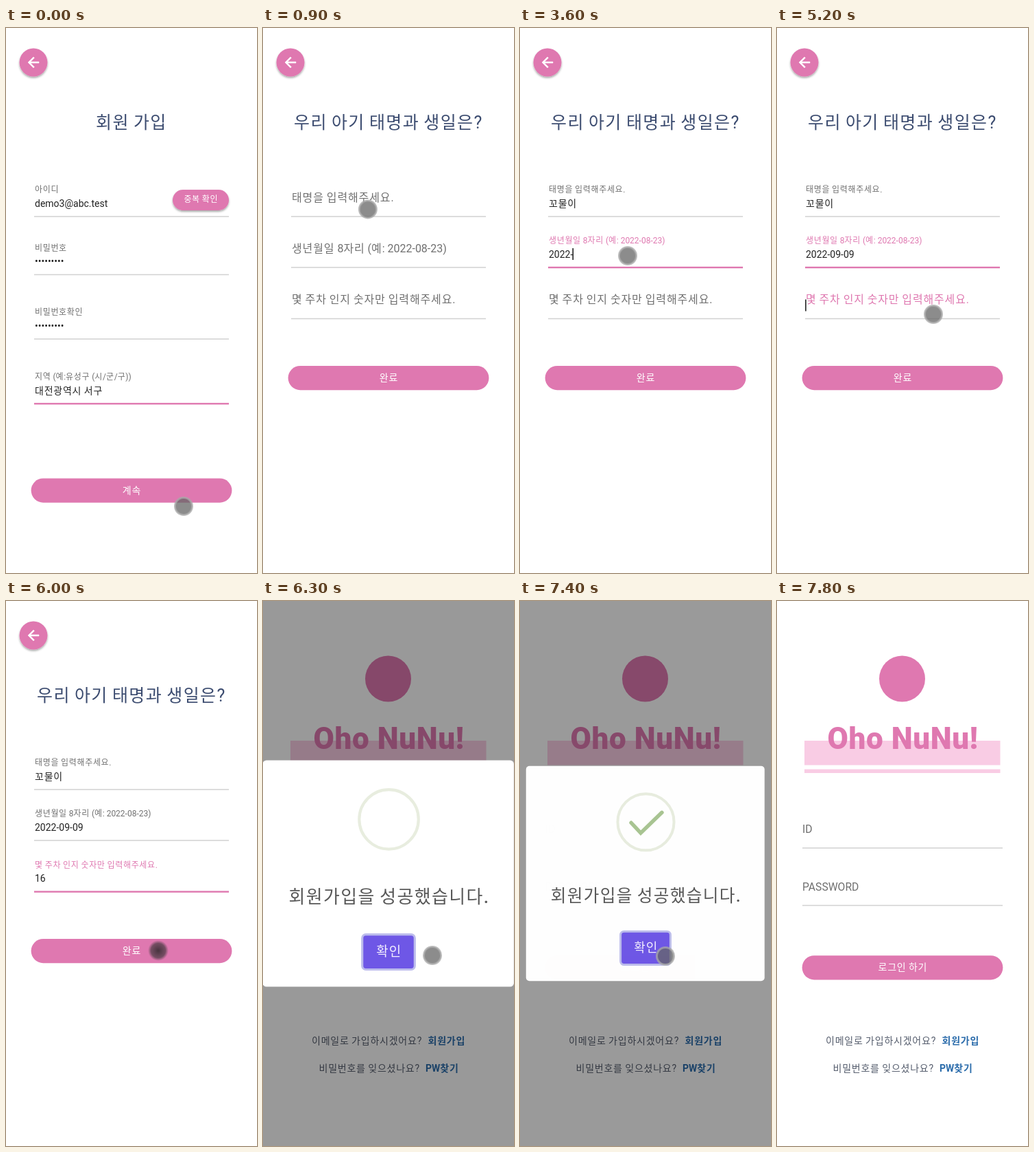
Write an HTML page that moves like this. It is 366 px wide and 792 px high and loops after 8.1 s.

```html
<!DOCTYPE html>
<html lang="ko">
<head>
<meta charset="utf-8">
<style>
  html, body { margin: 0; width: 100%; height: 100%; overflow: hidden; background: #fff; }
  svg { display: block; width: 366px; height: 792px; font-family: Roboto, "Noto Sans CJK KR", "Noto Sans CJK", sans-serif; }
  text { white-space: pre; }
  .ko { letter-spacing: .055em; }
  .thin .ko { font-weight: 300; }
</style>
</head>
<body>
<svg id="stage" viewBox="0 0 366 792">
  <defs>
    <filter id="shadow" x="-30%" y="-30%" width="160%" height="180%">
      <feDropShadow dx="0" dy="2" stdDeviation="1.5" flood-opacity=".35"/>
    </filter>
    <radialGradient id="press">
      <stop offset="0" stop-color="#222" stop-opacity=".8"/>
      <stop offset=".7" stop-color="#333" stop-opacity=".62"/>
      <stop offset="1" stop-color="#444" stop-opacity="0"/>
    </radialGradient>
  </defs>
  <g id="scene"></g>
</svg>
<script>
const LOOP = 8100, PINK = '#df78b0', INK = '#222', GREY = '#707070', NAVY = '#3c4c70';
const PAGE_2 = 400, LOGIN = 6170, CLOSE = 7400;
const scene = document.getElementById('scene');

const clamp = v => Math.min(1, Math.max(0, v));
const ease = v => v * v * (3 - 2 * v);
const mix = (a, b, k) => a + (b - a) * k;

// Value of a row track [[time, ...values]] at time t
function track(rows, t) {
  const i = rows.findIndex(r => r[0] > t);
  if (i < 0) return rows.at(-1).slice(1);
  if (!i) return rows[0].slice(1);
  const a = rows[i - 1], b = rows[i], k = ease((t - a[0]) / (b[0] - a[0]));
  return a.slice(1).map((v, j) => mix(v, b[j + 1], k));
}

const rect = (x, y, w, h, fill, more = '') =>
  `<rect x="${x}" y="${y}" width="${w}" height="${h}" fill="${fill}" ${more}/>`;

// Text placed by its vertical middle
function text(s, x, y, size, fill, more = '') {
  const body = s.replace(/[ㄱ-ㅎ가-힣]+/g, m => `<tspan class="ko">${m}</tspan>`);
  return `<text x="${x}" y="${y + size * .36}" font-size="${size}" fill="${fill}" ${more}>${body}</text>`;
}
const THIN = 'class="thin"', MID = 'text-anchor="middle"';

const button = (s, y) => rect(36.6, y, 292.8, 35.2, PINK, 'rx="17.6"') +
  text(s, 183.4, y + 17, 14, '#fff', MID + ' font-weight="500"');

const underline = (y, on, x = 41, w = 284) =>
  on ? rect(x, y - 1.2, w, 2.4, PINK) : rect(x, y - .8, w, 1.5, '#d2d2d2');

const header = (title, x) =>
  `<circle cx="40" cy="50" r="20.5" fill="${PINK}" filter="url(#shadow)"/>
   <path transform="translate(28 38)" fill="#fff" stroke="#fff" stroke-width=".5"
     d="M20 11H7.83l5.59-5.59L12 4l-8 8 8 8 1.41-1.41L7.83 13H20v-2z"/>` +
  text(title, x, 136.5, 25, NAVY, THIN);

const filled = (label, value, y, on) =>
  text(label, 42, y - 39, 12, GREY, THIN) + text(value, 42, y - 19.5, 14, INK) + underline(y, on);

function accountPage() {
  const dots = '•'.repeat(9);
  return header('회원 가입', 131) +
    filled('아이디', 'demo3@abc.test', 274) +
    rect(243, 235, 82, 30, PINK, 'rx="15" filter="url(#shadow)"') +
    text('중복 확인', 284.3, 248.5, 12, '#fff', MID + ' font-weight="500"') +
    filled('비밀번호', dots, 358.5) +
    filled('비밀번호확인', dots, 452) +
    filled('지역 (예:유성구 (시/군/구))', '대전광역시 서구', 546, true) +
    button('계속', 654.5);
}

const typed = (s, start, step, t) => s.slice(0, Math.max(0, Math.floor((t - start) / step) + 1));

function nickname(t) {
  const steps = ['', 'ㄲ', '꼬', '꼼', '꼬무', '꼬물', '꼬물ㅇ', '꼬물이'];
  return steps[Math.min(7, Math.max(0, Math.floor((t - 1550) / 100) + 1))];
}

const textWidth = s => [...s].reduce((w, c) => w + (c === '-' ? 3.9 : /\d/.test(c) ? 7.86 : 13.65), 0);

// Field with a floating label, focused from one time to another
function field(label, value, y, t, from, to) {
  const k = ease(clamp((t - from) / 200)), on = t >= from && t < to;
  const end = 42 + textWidth(value), composing = /[ㄱ-힣]/.test(value);
  let out = text(label, 42, mix(y - 28, y - 39, k), mix(16, 12, k), on ? PINK : GREY, THIN) +
    text(value, 42, y - 19.5, 14, INK) + underline(y, on && t > from + 30);
  if (on && composing) out += rect(end - 13.6, y - 12, 13, 1, INK);
  else if (on && Math.floor((t - from) / 500) % 2 === 0) out += rect(end - .9, y - 28, 1.6, 17, INK);
  return out;
}

function babyPage(t) {
  return header('우리 아기 태명과 생일은?', 45) +
    field('태명을 입력해주세요.', nickname(t), 274, t, 1100, 2480) +
    field('생년월일 8자리 (예: 2022-08-23)', typed('2022-09-09', 2900, 160, t), 348, t, 2450, 5250) +
    field('몇 주차 인지 숫자만 입력해주세요.', typed('16', 5550, 200, t), 422.5, t, 5190, 6100) +
    button('완료', 491);
}

function loginPage() {
  const link = '#2b6cab', bold = 'font-weight="700"';
  return `<circle cx="182.5" cy="113" r="33.5" fill="${PINK}"/>` +
    rect(40, 203, 285.5, 35.5, '#f9cce4') + rect(40, 244.5, 285.5, 5.5, '#f9cce4') +
    text('Oho NuNu!', 183.5, 198.8, 44, PINK, MID + ' font-weight="900" letter-spacing=".6"') +
    text('ID', 37, 331.5, 15.7, GREY) + underline(359, false, 37, 292) +
    text('PASSWORD', 37, 415.5, 15.7, GREY) + underline(442.5, false, 37, 292) +
    button('로그인 하기', 515.2) +
    text('이메일로 가입하시겠어요?', 71, 639, 14, '#545c6c', THIN) + text('회원가입', 240.5, 639, 14, link, bold) +
    text('비밀번호를 잊으셨나요?', 81.5, 679, 14, '#545c6c', THIN) + text('PW찾기', 237, 679, 14, link, bold);
}

function dialog(t) {
  const age = t - LOGIN, out = clamp((t - CLOSE) / 150);
  if (out === 1) return '';
  const [pop] = track([[0, .7], [135, 1.05], [240, .95], [300, 1]], age);
  const scale = pop * mix(1, .5, out), tick = 70 * (1 - ease(clamp((age - 350) / 400)));
  const down = t > 7220 && t < CLOSE;
  return rect(0, 0, 366, 792, '#000', `opacity="${.4 * clamp(age / 100) * (1 - out)}"`) +
    `<g transform="translate(182.7 396) scale(${scale}) translate(-182.7 -396)" opacity="${1 - out}">` +
    rect(8.2, 239.2, 349, 313.6, '#fff', 'rx="5"') +
    `<circle cx="183.5" cy="321" r="41.2" fill="none" stroke="#e8eddf" stroke-width="4"/>` +
    (tick < 70 ? `<path d="M162 322l14 15 31-30" fill="none" stroke="#a9c592" stroke-width="5.5"
      stroke-linecap="round" stroke-dasharray="70" stroke-dashoffset="${tick}"/>` : '') +
    text('회원가입을 성공했습니다.', 183.2, 428, 24.7, '#585858', MID + ' font-weight="500"') +
    rect(146.5, 480.5, 73, 48.5, down ? '#5a47c4' : '#6e57e6', 'rx="5" stroke="#bcbcec" stroke-width="3"') +
    text('확인', 183.7, 504, 18, '#f4f0ff', MID) + '</g>';
}

const PATH = [
  [0, 259, 695], [200, 258, 676], [450, 258, 676], [950, 150, 252], [2000, 150, 260],
  [2350, 155, 313], [2600, 155, 313], [3400, 157, 331], [4300, 157, 331], [5000, 228, 416],
  [5300, 228, 416], [5900, 222, 508], [6150, 222, 508], [6300, 247, 515], [6700, 247, 515],
  [7200, 212, 516], [7450, 212, 516], [7750, 390, 550]
];
const PRESSES = [230, 1000, 2360, 5080, 6000, 7240];

function cursor(t) {
  const [x, y] = track(PATH, t), down = PRESSES.some(p => t >= p && t < p + 110);
  return `<g transform="translate(${x} ${y})">` + (down
    ? '<circle r="15" fill="url(#press)"/>'
    : `<circle r="12.5" fill="#666" fill-opacity=".75" stroke="#aaa" stroke-opacity=".75" stroke-width="3"/>`) + '</g>';
}

function draw(now) {
  const t = now % LOOP;
  scene.innerHTML =
    (t < PAGE_2 ? accountPage() : t < LOGIN ? babyPage(t) : loginPage() + dialog(t)) + cursor(t);
}

const start = performance.now();
function tick() {
  draw(performance.now() - start);
  requestAnimationFrame(tick);
}
tick();
</script>
</body>
</html>
```
